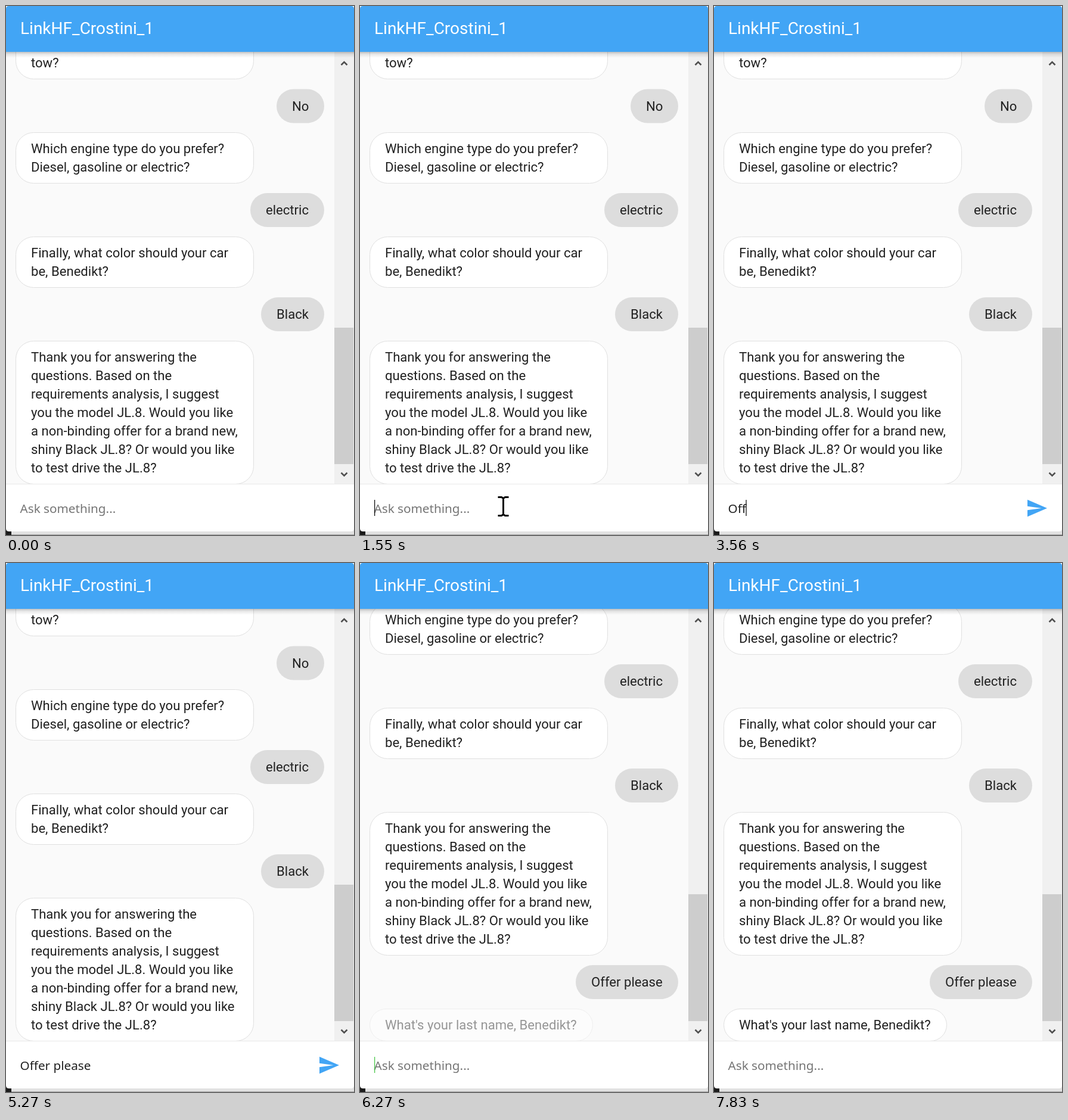
An HTML page that plays this animation: 584x888 px, repeating every 8000 ms.

```html
<!DOCTYPE html>
<html lang="en">
<head>
<meta charset="utf-8">
<style>
  html, body { margin: 0; width: 100%; height: 100%; overflow: hidden; background: #fafafa; }
  svg { display: block; width: 584px; height: 888px; }
  text { font: 22.1px Roboto, sans-serif; fill: #212121; white-space: pre; }
  #title { font-size: 28px; fill: #fff; }
  #input { font: 20.7px "Noto Sans", sans-serif; }
  .bot rect { fill: #fff; stroke: #e0e0e0; }
  .user rect { fill: #ddd; }
</style>
</head>
<body>
<svg viewBox="0 0 584 888">
  <defs>
    <linearGradient id="shade" x2="0" y2="1">
      <stop stop-opacity=".24"/>
      <stop offset=".4" stop-opacity=".09"/>
      <stop offset="1" stop-opacity="0"/>
    </linearGradient>
  </defs>
  <rect width="584" height="888" fill="#fafafa"/>
  <g id="chat"></g>

  <rect x="551" y="77" width="33" height="726" fill="#f0f0f0"/>
  <rect id="thumb" x="551" width="32" fill="#cdcdcd"/>
  <path d="M562.5 99l5-5 5 5M562.5 783.500l5 5 5-5" fill="none" stroke="#505050" stroke-width="2.6"/>

  <rect y="77" width="584" height="10" fill="url(#shade)"/>
  <path d="M0 77V5Q0 0 5 0H579Q584 0 584 5V77Z" fill="#42a5f5"/>
  <text id="title" x="24" y="47">LinkHF_Crostini_1</text>

  <rect y="876" width="584" height="12" fill="#e2e2e2"/>
  <rect y="887" width="584" height="1" fill="#a0a0a0"/>
  <rect y="876" width="9" height="12" fill="#1a1a1a"/>
  <path d="M0 802H584V877Q584 882 579 882H5Q0 882 0 877Z" fill="#fff"/>
  <rect y="802" width="584" height="1" fill="#e9e9e9"/>
  <text id="input" x="23.500" y="850.500"></text>
  <rect id="caret" y="829" width="1.200" height="27"/>
  <path id="send" d="M-10.490 9L10.500 0-10.490-9-10.500-2 4.500 0-10.500 2Z" fill="#42a5f5"/>
  <path id="pointer" d="M-9-15.500h6l3 2 3-2h6M0-14V14M-9 15.500h6l3-2 3 2h6" fill="none" stroke="#000" stroke-width="3"/>
</svg>
<script>
const LOOP = 8000, SENT = 5490, SCROLL = 144;
const $ = id => document.getElementById(id);
const clamp = v => Math.max(0, Math.min(1, v));

function svg(tag, attrs, parent) {
  const el = document.createElementNS('http://www.w3.org/2000/svg', tag);
  for (const key in attrs) el.setAttribute(key, attrs[key]);
  return parent.appendChild(el);
}

function bubble(kind, top, width, ...lines) {
  const bot = kind === 'bot', x = bot ? 16 : 534 - width;
  const height = bot ? 24 + 31 * lines.length : 57;
  const g = svg('g', { class: kind }, $('chat'));
  const inset = bot ? .5 : 0;
  svg('rect', { x: x + inset, y: top + inset, width: width - 2 * inset, height: height - 2 * inset,
    rx: Math.min(30, height / 2) }, g);
  lines.forEach((line, i) =>
    svg('text', { x: x + 26, y: top + (bot ? 35 : 36) + 31 * i }, g).textContent = line);
  return g;
}

bubble('bot', 37, 400, '', 'tow?');
bubble('user', 139.5, 80, 'No');
bubble('bot', 212, 400, 'Which engine type do you prefer?', 'Diesel, gasoline or electric?');
bubble('user', 314, 124, 'electric');
bubble('bot', 387, 400, 'Finally, what color should your car', 'be, Benedikt?');
bubble('user', 489, 106, 'Black');
bubble('bot', 562, 400, 'Thank you for answering the', 'questions. Based on the',
  'requirements analysis, I suggest', 'you the model JL.8. Would you like',
  'a non-binding offer for a brand new,', 'shiny Black JL.8? Or would you like',
  'to test drive the JL.8?');
const reply = bubble('user', 819, 172, 'Offer please');
const question = bubble('bot', 892, 375, "What's your last name, Benedikt?");

// [time, characters typed]
const typing = [[0, 0], [3090, 1], [3410, 2], [3560, 3], [3630, 4], [3710, 5], [4260, 6],
  [4430, 7], [4580, 9], [4740, 10], [4810, 11], [5040, 12], [SENT, 0]];
const caretToggles = [1550, 2080, 2560, 4220, 4260, 5270, SENT, 5740, 6270, 6820, 7280, 7830];
// [time, x, y]
const pointerPath = [[0, -50, 0], [1070, 287, 886], [1150, 248, 849], [1300, 252, 838],
  [1380, 248, 831], [1470, 240, 840], [1700, 101, 843], [1780, -50, 0]];
const at = (steps, t) => steps.findLast(step => step[0] <= t);

function draw(t) {
  const sent = t >= SENT;
  const held = SENT + Math.floor((t - SENT) / 78) * 78;

  $('chat').setAttribute('transform', `translate(0 ${sent ? -SCROLL : 0})`);
  $('thumb').setAttribute('y', sent ? 556 : 540);
  $('thumb').setAttribute('height', sent ? 213 : 229);
  reply.setAttribute('opacity', clamp((held - SENT) / 330));
  question.setAttribute('opacity', t < 6270 ? 0 : clamp((held - 6120) / 330));

  const typed = 'Offer please'.slice(0, at(typing, t)[1]);
  const input = $('input');
  input.textContent = typed || 'Ask something...';
  input.style.fill = typed ? '#212121' : '#757575';
  $('caret').setAttribute('x', typed ? 23 + input.getComputedTextLength() : 24);
  $('caret').setAttribute('fill', t >= 6270 && t < 6360 ? '#3fc43f' : '#000');
  $('caret').setAttribute('opacity', caretToggles.filter(time => time <= t).length % 2);

  const grow = clamp(Math.floor((t - 3090) / 80) * 80 / 240);
  const size = sent ? clamp(.86 - (held - SENT) / 250) : grow;
  $('send').setAttribute('transform', `translate(542.5 843) scale(${1.571 * size})`);

  const [, x, y] = at(pointerPath, t);
  $('pointer').setAttribute('transform', `translate(${x + .5} ${y})`);
}

const start = performance.now();
(function frame() {
  draw((performance.now() - start) % LOOP);
  requestAnimationFrame(frame);
})();
</script>
</body>
</html>
```
